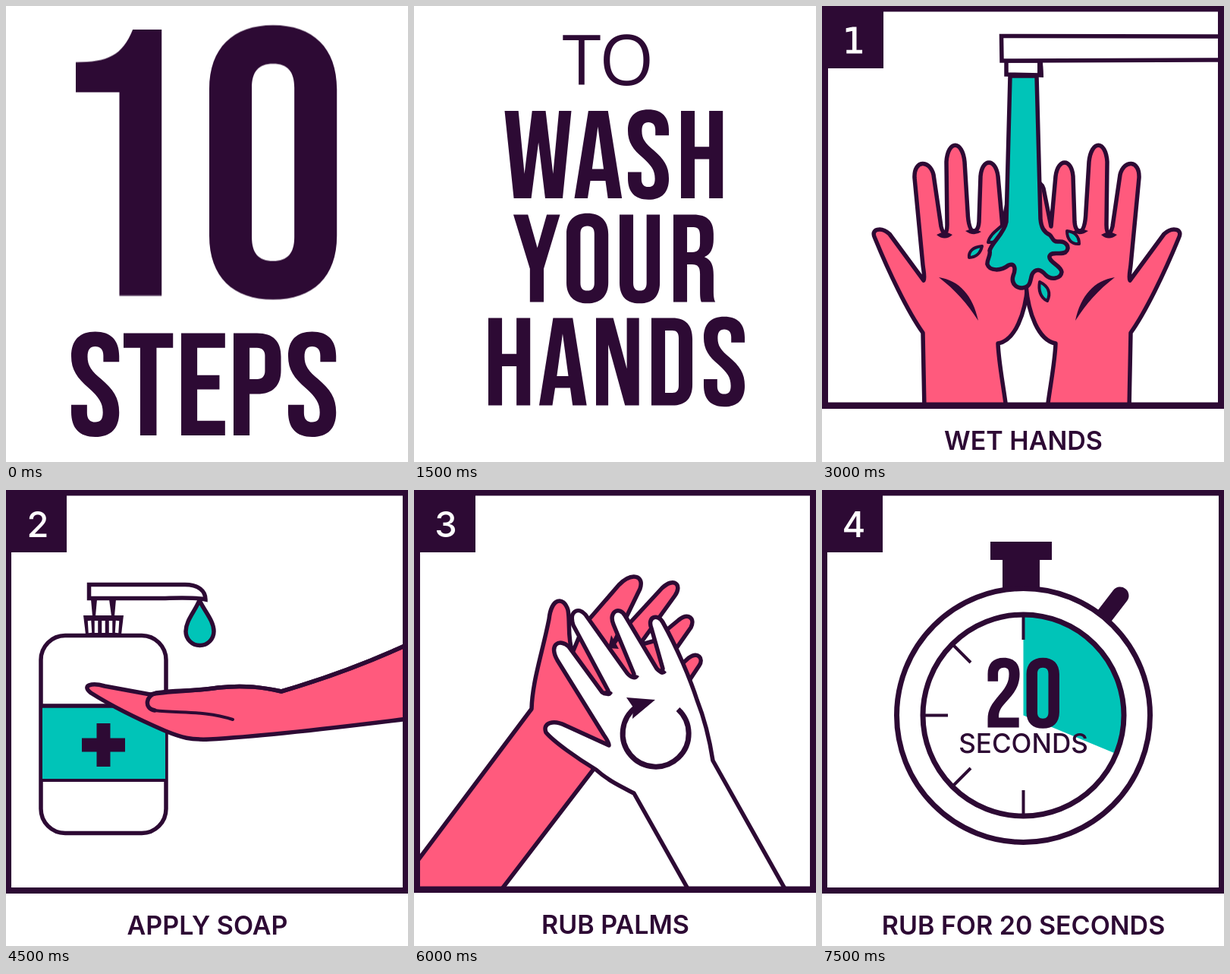
An HTML page that plays this animation: 530x600 px, repeating every 8000 ms.

```html
<!DOCTYPE html>
<html lang="en">
<head>
<meta charset="utf-8">
<title>10 steps to wash your hands</title>
<style>
  html, body { margin: 0; width: 100%; height: 100%; overflow: hidden; background: #fff; }
  svg { display: block; width: 530px; height: 600px; }
  .scene { opacity: 0; }
  .scene:first-of-type { opacity: 1; }
  .ink, text { fill: #2d0a34; }
  .line { fill: none; stroke: #2d0a34; stroke-width: 5.5; stroke-linejoin: round; stroke-linecap: round; }
  .thin { stroke-width: 4; }
  .sharp { stroke-linejoin: miter; stroke-linecap: butt; }
  .pink { fill: #ff5a7d; }
  .teal { fill: #00c4b8; }
  .white { fill: #fff; }
  text { font-family: Inter, sans-serif; text-anchor: middle; }
  .caption { font-size: 34px; font-weight: 600; }
  .badge { font-size: 47px; font-weight: 500; fill: #fff; }
  .footed { font-family: "DejaVu Sans", sans-serif; stroke: #fff; }
  .to { font: 92px "Open Sans", "Noto Sans", sans-serif; text-anchor: start; }
  .unit { font-size: 35px; font-weight: 500; }
</style>
</head>
<body>
<svg viewBox="0 0 530 600">
  <defs>
    <g id="hand">
      <path class="line pink" d="M135 530L133 430C113 402 88 350 70 306C63 293 78 290 89 300L134 361
        C136 358 134 350 133 341L122 226C121 202 142 202 147 222L157 290Q159 299 162 299Q165 298 165 288
        L164 205C166 176 185 176 188 205L192 270Q193 296 200 296Q206 296 207 284L209 224
        C211 200 229 200 232 224L238 290L248 240C252 228 266 228 266 250L271 368
        C268 404 255 440 232 444C233 470 239 498 243 530Z"/>
      <path class="ink" d="M154 357C181 361 199 381 206 414C191 391 176 374 154 357Z"/>
      <path class="ink" d="M151 301Q162 294 172 301Q162 310 151 301ZM189 296Q200 291 210 297Q200 304 189 296Z"/>
    </g>
  </defs>

  <g class="scene" id="steps"></g>

  <g class="scene" id="wash"><text class="to" x="195.5" y="103.500">TO</text></g>

  <g class="scene" data-step="1" data-caption="WET HANDS">
    <use href="#hand"/>
    <use href="#hand" transform="matrix(-1 0 0 1 540 0)"/>
    <path class="line thin teal" d="M243 283C236 292 221 299 219 311C231 312 240 304 243 283Z"/>
    <path class="line teal" d="M248 92L243 284C240 300 223 312 221 322C223 328 217 334 218 340
      C221 349 236 349 246 341C254 338 256 345 252 355C249 365 256 371 264 371
      C276 370 274 361 277 353C282 344 289 347 295 354C302 361 315 359 316 350
      C315 341 298 337 300 329C303 322 314 328 321 324C328 318 322 309 312 310
      C304 311 304 304 300 301C292 297 289 291 288 280L283 92Z"/>
    <path class="line thin teal" d="M211 316C199 317 193 323 194 331C203 331 209 325 211 316Z"/>
    <path class="line thin teal" d="M323 296C333 297 339 303 339 313C329 314 323 307 323 296Z"/>
    <path class="line thin teal" d="M287 363C299 369 302 378 297 388C288 384 285 374 287 363Z"/>
    <path class="line sharp white" d="M243 72H288L289 91L243 90Z"/>
    <path class="ink" d="M284 74H291L292 94L284 93Z"/>
    <path class="line sharp white" d="M530 40L236.500 39.500L237 72L530 71Z"/>
  </g>

  <g class="scene" data-step="2" data-caption="APPLY SOAP">
    <rect class="line white" x="46" y="191.5" width="165" height="260" rx="32"/>
    <path class="teal" d="M48 284H210V381H48Z"/>
    <path class="line sharp" d="M44 284H212"/>
    <path class="line sharp thin" d="M46 382H212"/>
    <path class="ink" d="M119.5 307H137.5V326.5H157V344.5H137.5V364H119.5V344.5H100V326.5H119.5Z"/>
    <path class="ink" d="M102 165H155L152 190H105Z"/>
    <path class="line sharp" style="stroke:#fff;stroke-width:4.5" d="M110 172L111 188M119 172V188M128.5 172V188M138 172V188M147 172L146 188"/>
    <path class="ink" d="M112 144H120L118 166H114ZM136 144H145L143 166H139Z"/>
    <path class="line sharp white" d="M109.5 124.5H236C254 124.5 263 133 263 144C250 141 230 142 206 142.5H109.5Z"/>
    <path class="line teal" d="M255 145C249 160 237 172 237 186A18.5 18.5 0 0 0 274 186C274 172 262 160 255 145Z"/>
    <path class="line pink" d="M112 267C99 257 113 253 130 258L190 269C214 264 250 265 280 260
      C315 256 340 260 363 265C428 246 480 226 530 203V301C450 311 340 324 268 328
      C243 329 232 326 210 317C180 304 142 286 112 267Z"/>
    <path class="line" d="M530 203C480 226 428 246 363 265C340 260 315 256 280 260C250 265 224 263 198 267C185 270 181 287 196 290"/>
    <path class="line thin" d="M196 290C230 294 262 290 299 302"/>
  </g>

  <g class="scene" data-step="3" data-caption="RUB PALMS">
    <path class="line pink" d="M0 494L155 288C156 252 169 215 178 170C181 142 197 139 203 158C206 175 202 194 209 214
      L224 178L270 125C287 108 304 112 298 130L262 204L278 182L327 129C343 114 354 125 344 139L297 204L315 199
      L349 171C362 161 371 169 365 181L332 228L352 230L362 221C375 212 382 222 376 231L350 270L237 367L112 530H0Z"/>
    <path class="line white" d="M290 399C275 391 258 384 240 368C215 353 184 331 174 319C169 306 184 302 200 310
      L257 336Q257 332 250 322L189 224C177 203 192 195 204 206L248 266Q255 271 256 264
      L210 178C204 160 216 153 226 164L281 241Q289 250 290 242L263 177C256 161 270 152 278 165
      L320 235Q327 242 328 235L313 182C307 167 321 162 328 174C347 208 364 248 373 276
      Q387 311 394 356L492 530H364Z"/>
    <path class="ink" d="M248 266Q257 261 262 267Q257 276 248 266ZM283 245Q291 241 297 245Q291 254 283 245ZM320 238Q328 233 333 240Q327 247 320 238ZM256 208L260 191L270 209Z"/>
    <path class="line sharp" style="stroke-width:7" d="M348 288.5A43.5 43.5 0 1 1 293 285.5"/>
    <path class="ink" d="M318 276L280 273L289 286L288 301Z"/>
  </g>

  <g class="scene" data-step="4" data-caption="RUB FOR 20 SECONDS" id="watch">
    <path class="ink" d="M222 68H303V92H287V134H238V92H222Z"/>
    <path class="line" style="stroke-width:23" d="M366 174L393 139"/>
    <circle class="line white" style="stroke-width:7" cx="265.5" cy="296.5" r="167"/>
    <path class="teal" d="M265.5 296.5V165A131.5 131.5 0 0 1 387 346.8Z"/>
    <path class="line sharp thin" d="M265.5 166V197M134 296.5H166M173 204L196 227M173 389L196 366M265.5 395V428"/>
    <circle class="line" style="stroke-width:7" cx="265.5" cy="296.5" r="132.5"/>
    <text class="unit" x="265.5" y="346">SECONDS</text>
  </g>
</svg>
<script>
// Condensed capitals, drawn on a cap height of 100.
const ring = 'M0 22.5C0 7 9-1.5 24-1.5S48 7 48 22.5V77.5C48 93 39 101.5 24 101.5S0 93 0 77.5ZM16 22V78C16 84 18.5 87 24 87S32 84 32 78V22C32 16 29.5 13 24 13S16 16 16 22Z';
const glyphs = {
  0: ring,
  O: ring,
  1: 'M32.3 0H21.5C17.5 10 12 12.4 0 12.4V23.7H16.4V100H32.3Z',
  2: 'M0 33V22.5C0 7 8-1.5 23.3-1.5S46.5 7 46.5 22.5C46.5 42 36 53 25 65C18 73 16 77 16 85.7H45.5V100H0V88C0 74 5.5 66 16.5 53C26.5 41.5 31 34 31 22C31 15 28.5 13 23.5 13S15 16 15 22V33Z',
  A: 'M0 100L16 0H38.5L54.5 100H38.4L35.6 80H18.3L15.2 100ZM20.3 66.5H33.5L26.9 18Z',
  D: 'M0 0H24C39.5 0 47 8.5 47 24V76C47 91.5 39.5 100 24 100H0ZM15.7 14.3V85.7H24C29 85.7 31.3 83 31.3 77V23C31.3 17 29 14.3 24 14.3Z',
  E: 'M0 0H43V14.3H15.7V41H37.5V55H15.7V85.7H43V100H0Z',
  H: 'M0 0H15.7V41H32.3V55.3H32.3V0H48V100H32.3V55.3H15.7V100H0Z',
  N: 'M0 0H19.7L35.3 58V0H49.3V100H33.2L14 30.5V100H0Z',
  P: 'M0 0H23C39 0 46.5 8 46.5 23V36C46.5 51 39 59.5 23 59.5H15.7V100H0ZM15.7 14.3V45H23C28 45 30.8 42 30.8 37V22C30.8 17 28 14.3 23 14.3Z',
  R: 'M0 0H23C39 0 46 7.5 46 22V28C46 39 42.5 45.5 35.5 48.5C43.5 51.5 46 58.5 46 69V87C46 93 46.3 96.5 48 100H32C31 97 30.5 95.5 30.5 87V68C30.5 60 28 57 21.5 57H15.7V100H0ZM15.7 14.3V43H21.5C27.5 43 30.5 40 30.5 33V24C30.5 17.5 28.5 14.3 23 14.3Z',
  S: 'M47 28V22.5C47 7 39-1.5 23.5-1.5S0 7 0 22.5C0 36 6 44 17 53.5C27 62.5 31 68 31 77.5C31 84.5 28.5 87 23.5 87S15.5 84 15.5 78V70H0V77C0 93 8 101.5 23.5 101.5S47 93 47 77.5C47 63 41 55 29.5 45C20 37 16 32 16 23C16 16 18.5 13 23.5 13S31.5 16 31.5 22V28Z',
  T: 'M0 0H48.5V14.3H32.3V100H16.3V14.3H0Z',
  U: 'M0 0H15.7V78C15.7 84 18 87 23.3 87S31 84 31 78V0H46.2V77.5C46.2 93 38.5 101.5 23 101.5S0 93 0 77.5Z',
  W: 'M0 0H15.8L22.7 72L31.5 0H47L55.5 72L62.3 0H76.5L66.5 100H46.5L38.8 36L30.5 100H10.5Z',
  Y: 'M0 0H16.7L27.5 38L38.3 0H53.5L34.8 62V100H19V62Z'
};

const add = (parent, markup) => parent.insertAdjacentHTML('beforeend', markup);

function word(id, text, y, scale, xs) {
  const letters = [...text].map((c, i) =>
    `<path fill-rule="evenodd" transform="translate(${xs[i]} ${y}) scale(${scale})" d="${glyphs[c]}"/>`);
  add(document.getElementById(id), `<g class="ink" role="img"><title>${text}</title>${letters.join('')}</g>`);
}

word('steps', '10', 30.5, 3.505, [92, 268]);
word('steps', 'STEPS', 430.5, 1.345, [86, 155, 231, 300, 372]);
word('wash', 'WASH', 138, 1.15, [119.5, 211.5, 282, 352]);
word('wash', 'YOUR', 274.5, 1.15, [131, 201, 271, 342]);
word('wash', 'HANDS', 410.5, 1.15, [98, 165, 240, 313, 382]);
word('watch', '20', 222, 0.905, [218.5, 269.5]);

// Odd and even panels have slightly different border widths.
for (const scene of document.querySelectorAll('[data-step]')) {
  const { step, caption } = scene.dataset;
  const odd = step % 2;
  const [edge, right, bottom] = odd ? [8, 522, 521.5] : [7, 523, 523];
  const end = odd ? 530 : 531;
  add(scene, `
    <path class="ink" fill-rule="evenodd" d="M0 0H530V${end}H0ZM${edge} 7.5H${right}V${bottom}H${edge}Z"/>
    <path class="white" d="M0 ${end}H530V600H0Z"/>
    <path class="ink" d="M0 0H${odd ? 81 : 80}V82H0Z"/>
    <text class="badge ${step === '1' ? 'footed' : ''}" x="42" y="62">${step}</text>
    <text class="caption" x="265.5" y="${odd ? 583.5 : 585}">${caption}</text>`);
}

// Hard cuts between scenes.
const cuts = [0, 1500, 3000, 4500, 6000, 7500, 8000];
const duration = cuts.at(-1);
document.querySelectorAll('.scene').forEach((scene, i) => {
  const start = cuts[i] / duration, end = cuts[i + 1] / duration;
  const frames = [[0, i ? 0 : 1], [start, 1], [end, 0], [1, 0]]
    .map(([offset, opacity]) => ({ offset, opacity, easing: 'step-end' }));
  scene.animate(frames, { duration, iterations: Infinity });
});
</script>
</body>
</html>
```
